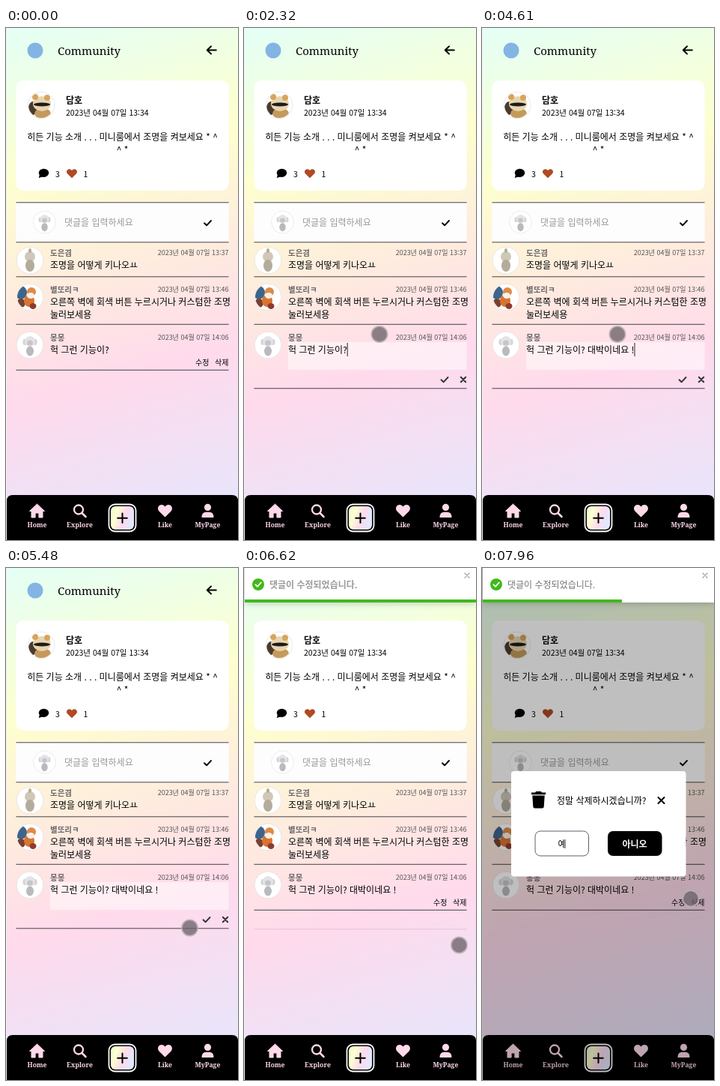
Recreate the animation shown at these times as an HTML page. Size 310 by 683 pixels, loop 8000 ms.

```html
<!DOCTYPE html>
<html lang="ko">
<head>
<meta charset="utf-8">
<title>Community</title>
<style>
  html, body { margin: 0; width: 100%; height: 100%; overflow: hidden; }
  body { background: linear-gradient(165deg, #e4fff6 0%, #fdffcf 27%, #ffdaec 66%, #e2e8ff 100%); }
  svg { display: block; width: 310px; height: 683px; }
  text { font-family: 'Noto Sans CJK KR', 'Noto Sans', sans-serif; white-space: pre; }
  .slab { font-family: 'Noto Serif', serif; }
  .toast { filter: drop-shadow(0 1px 5px rgba(0,0,0,.22)); }
</style>
</head>
<body>
<svg id="stage" viewBox="0 0 310 683" xmlns="http://www.w3.org/2000/svg"></svg>
<script>
const LOOP = 8000;
const EDIT = [1050, 6110];
const TOAST_IN = 6350, MODAL_IN = 7770;
const LEFT = 13.4, RIGHT = 297.6;
const OLD_TEXT = '헉 그런 기능이?';

// [time, typed text, last syllable still being composed]
const TYPING = [
  [0, '', 0], [2850, ' ', 0], [2960, ' ㄷ', 1], [3080, ' 대', 1], [3210, ' 댑', 1],
  [3350, ' 대바', 1], [3550, ' 대박', 1], [3620, ' 대박이', 1], [3730, ' 대박인', 1],
  [3800, ' 대박이네', 1], [3940, ' 대박이넹', 1], [4010, ' 대박이네요', 1],
  [4200, ' 대박이네요 ', 0], [4340, ' 대박이네요 !', 0]
];

// [time, x, y]
const POINTER = [
  [260, 288, 598], [800, 262, 449], [1250, 262, 449], [1530, 159, 435],
  [2190, 159, 435], [2320, 181, 408.5], [5220, 181, 408.5], [5480, 245.5, 480],
  [5760, 268, 469], [6350, 268, 469], [6600, 287.5, 503], [6760, 287.5, 503],
  [7090, 288, 444], [7720, 288, 444], [7920, 279, 441]
];
const CLICKS = [[900, 1050], [1780, 1870], [5930, 6080], [7560, 7720]];

const text = (x, y, str, size = 12, more = '') =>
  `<text x="${x}" y="${y}" font-size="${size}" ${more}>${str}</text>`;
const rect = (x, y, w, h, fill, more = '') =>
  `<rect x="${x}" y="${y}" width="${w}" height="${h}" fill="${fill}" ${more}/>`;
const panel = (y, h, fill, more) => rect(LEFT, y, RIGHT - LEFT, h, fill, more);
const rule = (y, color = '#484448') => panel(y + .3, 1, color);
const stroke = (d, width, color = '#000') =>
  `<path d="${d}" fill="none" stroke="${color}" stroke-width="${width}" stroke-linecap="round" stroke-linejoin="round"/>`;
const at = (x, y, body, scale = 1) => `<g transform="translate(${x} ${y}) scale(${scale})">${body}</g>`;
const check = (x, y, color) => at(x, y, stroke('M-4.5 .3L-1.4 3.3L4.5-3', 1.9, color));
const cross = (x, y, r, width, color) =>
  at(x, y, stroke(`M${-r} ${-r}L${r} ${r}M${r} ${-r}L${-r} ${r}`, width, color));
const heart = (x, y, scale, color) => at(x, y,
  `<path fill="${color}" d="M0 9L-8.3 .7C-12-3-9-8.5-4.8-8.3C-2.5-8.2-1-7 0-5.6C1-7 2.5-8.2 4.8-8.3C9-8.5 12-3 8.3 .7Z"/>`, scale);

// Blobs are [cx, cy, rx, ry, color] around the avatar centre.
const BLOBS = {
  tan: [[-11, 4, 6, 9, '#4a3a2e'], [2, 11, 11, 7, '#c49a5c'], [1, -2, 12, 10, '#e8d5ae'],
        [-8, -11, 4, 4, '#d8a45d'], [8, -10, 4, 4, '#d8a45d'], [1, -1, 11, 2.6, '#1d1b1c']],
  beige: [[0, -5, 7, 7, '#cfc8b6'], [0, 7, 6, 8, '#b3ac9b'], [0, -13, 2, 3, '#b9ad8e']],
  orange: [[-12, -6, 8, 9, '#3d658c'], [-12, 8, 6, 6, '#7a4130'], [-1, 5, 7, 8, '#d9742f'],
           [2, -7, 6, 6, '#e08a45'], [1, -2, 5, 4, '#f6f1ec'], [4, 12, 4.5, 4, '#8f3a30']],
  gray: [[-7, -4, 2.5, 4, '#d2d2d6'], [7, -4, 2.5, 4, '#d2d2d6'], [0, -5, 7, 7, '#e4e4e7'],
         [0, -3, 4, 3.5, '#c6c6ca'], [0, 8, 5, 6.5, '#b9b9be']]
};
const avatar = (x, y, kind, scale = 1) => at(x, y,
  '<circle r="17.8" fill="#fff" stroke="#e3e3e3" stroke-width=".8"/><g clip-path="url(#round)">' +
  BLOBS[kind].map(([cx, cy, rx, ry, c]) =>
    `<ellipse cx="${cx}" cy="${cy}" rx="${rx}" ry="${ry}" fill="${c}"/>`).join('') + '</g>', scale);

const comment = (y, kind, name, time, lines) =>
  avatar(32, y + 10, kind) +
  text(59, y + 3.5, name, 10.5, 'font-weight="700" fill="#6b666a"') +
  text(297.5, y + 3, `2023년 04월 07일 ${time}`, 9, 'text-anchor="end" fill="#555"') +
  lines.map((line, i) => text(59, y + 20.5 + i * 17, line)).join('');

const PINK = '#ffd9ea';
const navItem = (x, label, icon) => at(x, 644, icon) +
  text(x, 666, label, 8.7, `class="slab" font-weight="700" text-anchor="middle" fill="${PINK}"`);

const header =
  '<circle cx="39" cy="30" r="10.5" fill="#84b4e4"/>' +
  text(69, 36, 'Community', 15, 'class="slab" font-weight="500"') +
  stroke('M280.8 29.5H269M274 24.5L268.8 29.5L274 34.5', 2);

const post =
  panel(70, 147, '#fff', 'rx="10"') + avatar(47, 103, 'tan') +
  text(80, 100.5, '담호', 12, 'font-weight="700"') +
  text(80, 117, '2023년 04월 07일 13:34', 10.5) +
  text(155.5, 149.5, '히든 기능 소개 . . . 미니룸에서 조명을 켜보세요 * ^', 12, 'text-anchor="middle"') +
  text(155.5, 166.5, '^ *', 12, 'text-anchor="middle"') +
  '<ellipse cx="50.5" cy="193.3" rx="6.7" ry="5.6"/><path d="M45 195L43.8 200L50 198Z"/>' +
  text(66, 199, '3', 10.5, 'font-weight="500"') + heart(88, 194, .7, '#b04a22') +
  text(103.5, 199, '1', 10.5, 'font-weight="500"');

const entry =
  panel(232, 54, '#fdfdfd') + rule(232) + rule(285) +
  avatar(51.5, 259, 'gray', .84) + text(78, 263.5, '댓글을 입력하세요', 12, 'fill="#999"') +
  check(269.5, 260, '#000');

const comments =
  comment(300, 'beige', '도은겸', '13:37', ['조명을 어떻게 키나오ㅛ']) + rule(331) +
  comment(349, 'orange', '별또리ㅋ', '13:46',
    ['오른쪽 벽에 회색 버튼 누르시거나 커스텀한 조명', '눌러보세용']) + rule(394.5);

const ownComment =
  `<g id="editing">${rect(59, 419, 238.5, 37, '#fff', 'opacity=".5"')}` +
  check(268, 469, '#333') + cross(293, 469, 3.2, 2, '#333') + rule(480) + '</g>' +
  comment(413, 'gray', '몽몽', '14:06', []) + text(59, 433.5, OLD_TEXT, 12, 'id="typed"') +
  `<g id="viewing">${text(253, 450, '수정', 10)}${text(279, 450, '삭제', 10)}${rule(455.5)}</g>` +
  `<g id="residue">${rule(481, 'rgba(80,50,70,.15)')}</g>` +
  rect(0, 420, 1, 18, '#222', 'id="caret"') + rect(0, 437, 11, 1, '#555', 'id="underline"');

const nav =
  '<path d="M1 683V631Q1 623 9 623H302Q310 623 310 631V683Z"/>' +
  navItem(41.5, 'Home', `<path fill="${PINK}" d="M0-9L10 .5H7.5V9H2.4V3H-2.4V9H-7.5V.5H-10Z" stroke="${PINK}" stroke-linejoin="round"/>`) +
  navItem(98.5, 'Explore', `<circle cx="-1.5" cy="-1.5" r="6" fill="none" stroke="${PINK}" stroke-width="2.3"/>` + stroke('M3 3L8 8', 2.5, PINK)) +
  rect(137.5, 635.5, 36, 36, '#000', 'rx="8" stroke="#fff" stroke-width="1.8"') +
  rect(140, 638, 31, 31, 'url(#plus)', 'rx="6"') + stroke('M155.5 647.5V660M149.2 653.7H161.8', 2) +
  navItem(212.5, 'Like', heart(0, 0, .95, PINK)) +
  navItem(269.5, 'MyPage', `<circle cy="-4.6" r="4.6" fill="${PINK}"/><path fill="${PINK}" d="M-8 9Q-8 1.8-2 1.8H2Q8 1.8 8 9Z"/>`);

const modal =
  rect(0, 0, 310, 683, '#000', 'opacity=".25"') +
  rect(39, 271, 233.5, 140.5, '#fff', 'rx="4"') +
  '<path d="M66 299.5H71L72.3 298H78.7L80 299.5H85V302.3H66ZM67.3 303.5H83.7L82.7 318.5Q82.5 320.5 80.5 320.5H70.5Q68.5 320.5 68.3 318.5Z"/>' +
  text(100, 314.5, '정말 삭제하시겠습니까?', 12, 'font-weight="500"') + cross(239.5, 310, 4, 2, '#000') +
  rect(71, 351, 71.5, 33, '#fff', 'rx="7" stroke="#5f5f70"') +
  text(107, 372.5, '예', 12, 'text-anchor="middle"') +
  rect(168, 351, 72.5, 33, '#000', 'rx="7"') +
  text(204, 372.5, '아니오', 12, 'text-anchor="middle" font-weight="700" fill="#fff"');

const toast =
  rect(1, -30, 309, 76, '#fff') + rect(1, 42, 309, 4, '#40b91a', 'id="progress"') +
  '<circle cx="19" cy="22" r="8" fill="#40b91a"/>' + at(19, 22, stroke('M-3.6 .2L-1 2.8L3.8-2.6', 1.8, '#fff')) +
  text(34, 26.5, '댓글이 수정되었습니다.', 12, 'id="notice" fill="#757575"') + cross(298, 10, 3, 1.4, '#a5a5a5');

const stage = document.getElementById('stage');
stage.innerHTML =
  `<defs><clipPath id="round"><circle r="17"/></clipPath>
   <linearGradient id="plus" x2="1" y2=".35"><stop stop-color="#e9fbd2"/><stop offset=".3" stop-color="#fdffcf"/>
   <stop offset=".66" stop-color="#ffdaec"/><stop offset="1" stop-color="#e2e8ff"/></linearGradient></defs>` +
  rect(0, 0, 1, 683, '#f1f1f1') + header + post + entry + comments + ownComment + nav +
  `<g id="modal">${modal}</g><g id="toast" class="toast">${toast}</g>` +
  '<circle id="pointer" r="10.6" stroke-width="1.8"/>';

const el = {};
stage.querySelectorAll('[id]').forEach(node => el[node.id] = node);
const show = (node, on) => node.setAttribute('display', on ? 'inline' : 'none');
const within = (t, [from, to]) => t >= from && t < to;
const clamp = v => Math.min(1, Math.max(0, v));
const ease = p => p * p * (3 - 2 * p);

function pointerAt(t) {
  const i = POINTER.findIndex(p => p[0] > t);
  if (i < 0) return POINTER[POINTER.length - 1].slice(1);
  if (i === 0) return POINTER[0].slice(1);
  const [t0, x0, y0] = POINTER[i - 1], [t1, x1, y1] = POINTER[i];
  const p = ease((t - t0) / (t1 - t0));
  return [x0 + (x1 - x0) * p, y0 + (y1 - y0) * p];
}

function drawTyping(t) {
  const [, typed, composing] = TYPING.filter(k => k[0] <= t).pop();
  el.typed.textContent = OLD_TEXT + typed;
  const end = 59 + el.typed.getComputedTextLength();
  el.caret.setAttribute('x', end);
  el.underline.setAttribute('x', end - 11);
  show(el.caret, within(t, [1860, 4880]));
  show(el.underline, composing);
}

function drawToast(t) {
  const p = clamp((t - TOAST_IN) / 240);
  const y = -56 * (1 - p) ** 2 + 7 * Math.sin(Math.PI * p) * p;
  show(el.toast, t >= TOAST_IN);
  el.toast.setAttribute('transform', `translate(0 ${y})`);
  el.progress.setAttribute('width', 309 * clamp(1 - (t - 6730) / 3090));
  const settling = t < 6720;
  el.notice.setAttribute('font-weight', settling ? 700 : 400);
  el.notice.setAttribute('fill', settling ? '#9a9a9a' : '#757575');
}

function drawPointer(t) {
  const [x, y] = pointerAt(t);
  const pressed = CLICKS.some(c => within(t, c));
  show(el.pointer, t >= 260);
  el.pointer.setAttribute('transform', `translate(${x} ${y})`);
  el.pointer.setAttribute('fill', pressed ? 'rgba(190,180,30,.75)' : 'rgba(108,98,104,.78)');
  el.pointer.setAttribute('stroke', pressed ? 'rgba(205,195,60,.7)' : 'rgba(186,176,182,.85)');
}

function draw(t) {
  const editing = within(t, EDIT);
  show(el.editing, editing);
  show(el.viewing, !editing);
  show(el.residue, within(t, [EDIT[1], MODAL_IN]));
  show(el.modal, t >= MODAL_IN);
  drawTyping(t);
  drawToast(t);
  drawPointer(t);
}

const start = performance.now();
function tick() {
  draw((performance.now() - start) % LOOP);
  requestAnimationFrame(tick);
}
tick();
</script>
</body>
</html>
```
